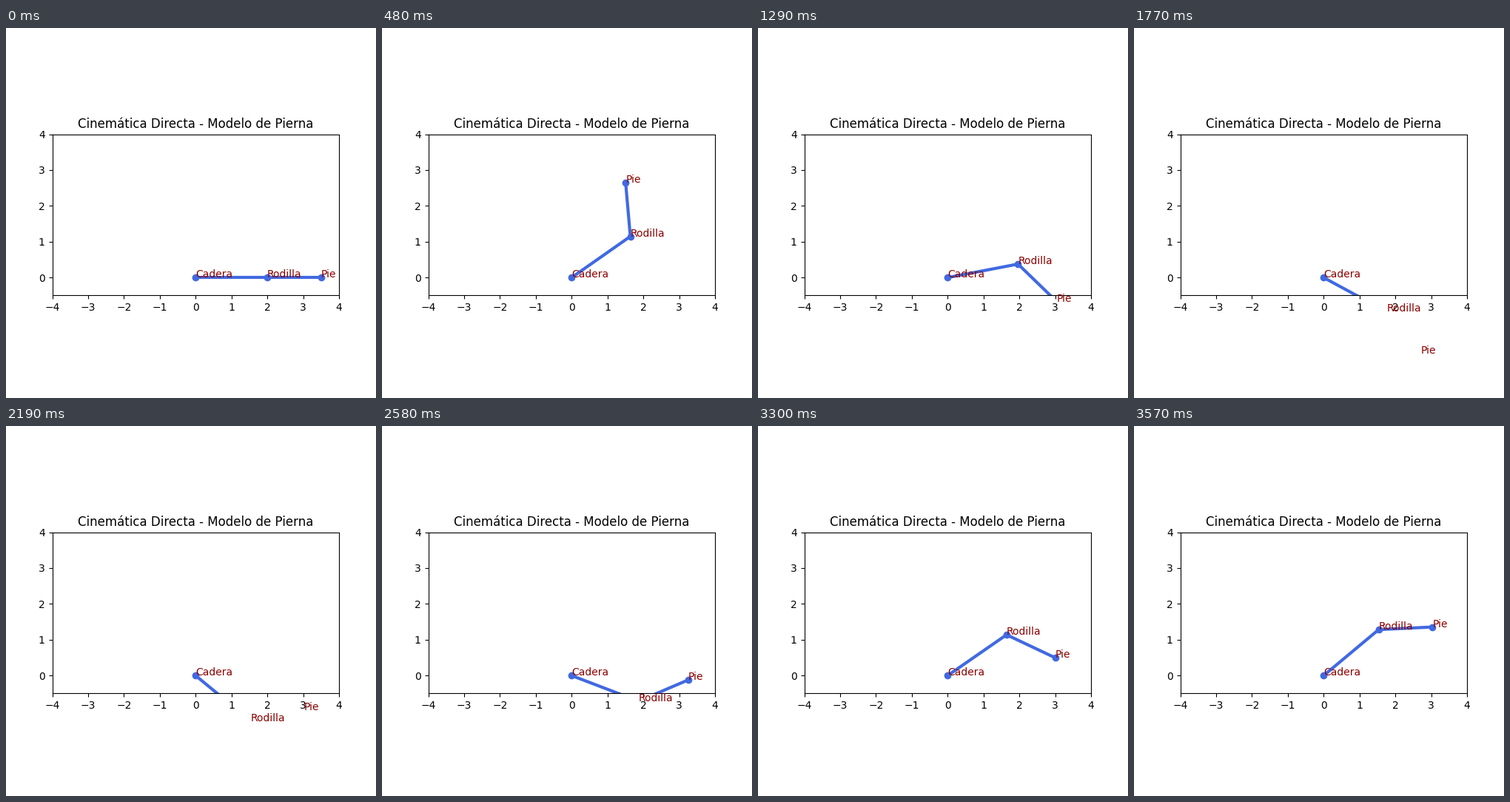
Write a matplotlib script that moves like this. It is 500x500 px and loops after 3600 ms.

```python
import numpy as np
import matplotlib.pyplot as plt
from matplotlib.animation import FuncAnimation

FRAMES = 120
INTERVAL = 30  # ms
THIGH, SHIN = 2.0, 1.5
JOINTS = ("Cadera", "Rodilla", "Pie")


def leg_points(i):
    """Forward kinematics: hip, knee and foot positions."""
    hip = np.radians(40 * np.sin(i / 15))
    knee = np.radians(60 * np.sin(i / 10))
    angles = np.array([hip, hip + knee])
    lengths = np.array([THIGH, SHIN])
    x = np.concatenate(([0], np.cumsum(lengths * np.cos(angles))))
    y = np.concatenate(([0], np.cumsum(lengths * np.sin(angles))))
    return x, y


plt.rcParams["font.family"] = "DejaVu Sans"
fig, ax = plt.subplots(figsize=(5, 5), dpi=100)
ax.set_xlim(-4, 4)
ax.set_ylim(-0.5, 4)
ax.set_aspect("equal")
ax.set_title("Cinemática Directa - Modelo de Pierna")

leg, = ax.plot([], [], "o-", lw=3, color="royalblue")
labels = [ax.text(0, 0, name, fontsize=10, color="darkred") for name in JOINTS]


def update(i):
    x, y = leg_points(i)
    leg.set_data(x, y)
    for label, px, py in zip(labels, x, y):
        label.set_position((px, py))
    return [leg, *labels]


anim = FuncAnimation(fig, update, frames=FRAMES, interval=INTERVAL,
                     repeat=True, repeat_delay=0)
plt.show()
```
